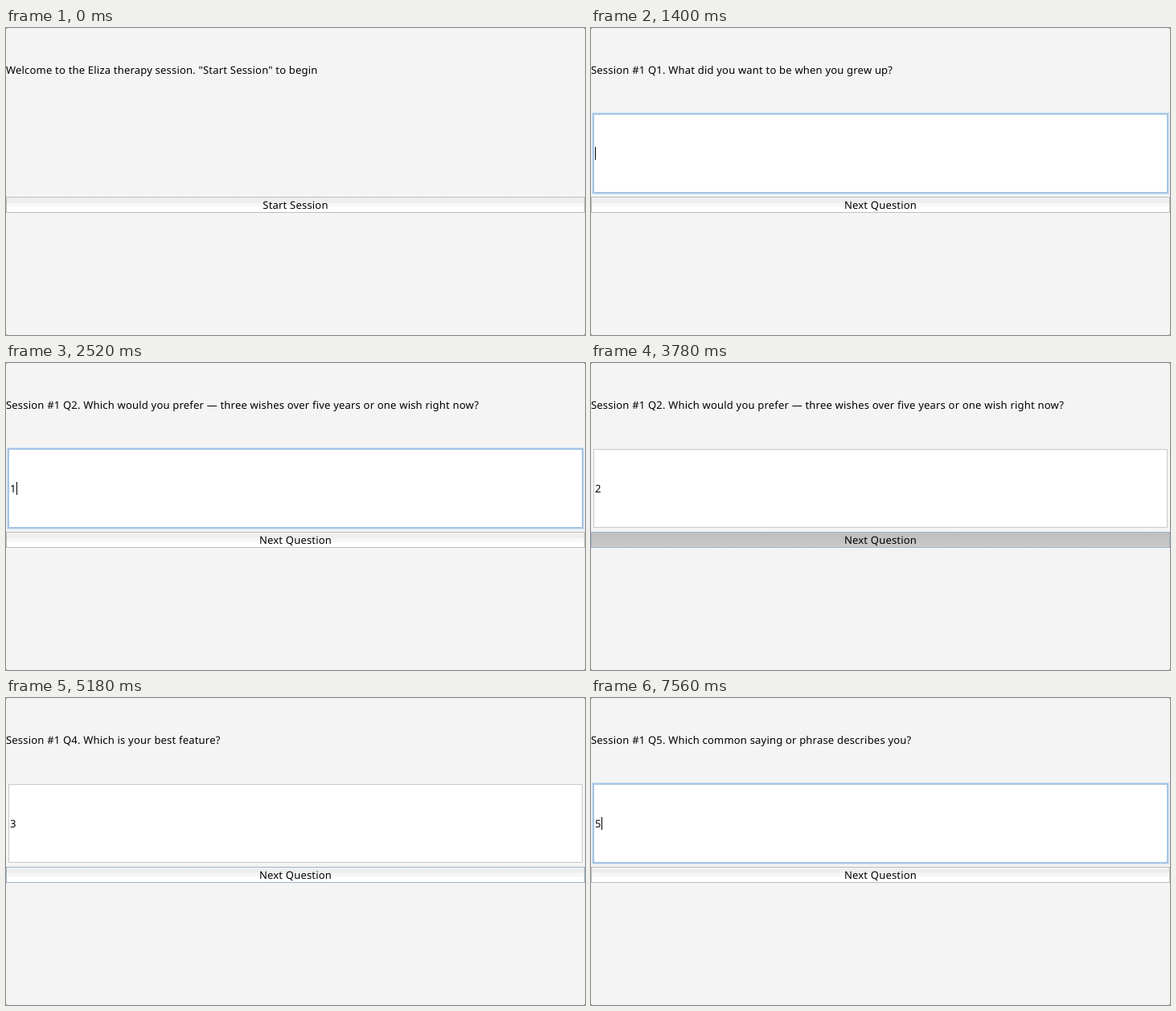
These frames come from a looping animation (720x382 px, 8000 ms). An HTML page:

```html
<!DOCTYPE html>
<html lang="en">
<head>
<meta charset="utf-8">
<title>Eliza therapy session</title>
<style>
html, body { margin: 0; width: 100%; height: 100%; overflow: hidden; background: #777; }
#stage {
  position: relative; width: 720px; height: 382px; overflow: hidden;
  background: #f4f4f4; border-radius: 2px; color: #000;
  font: 13px/18px "Noto Sans", "Open Sans", sans-serif;
  letter-spacing: .2px; text-rendering: geometricPrecision; white-space: pre;
}
#stage div { position: absolute; box-sizing: border-box; }
#prompt { left: 0; top: 43px; }
#field { left: 3px; top: 107px; width: 714px; height: 98px; background: #fff; border: 1px solid #c9c9c9; }
#field.focus { border-color: #a6c5e3; box-shadow: 0 0 0 1px #a3c4e4, 0 0 1px 2px #d3e4f5; }
#mark { left: 0; top: 40px; width: 10px; height: 16px; background: #b5d5ff; }
#answer { left: 1px; top: 39px; }
#caret { top: 40px; width: 1px; height: 16px; background: #000; }
#button {
  left: 0; top: 210px; width: 720px; height: 20px; text-align: center;
  border: 1px solid #bdbdbd;
  background: linear-gradient(#f1f1f1, #ececec 6px, #f6f6f6 7px, #f8f8f8 11px, #fff 12px);
}
#button.down { border-color: #bebebe; background: linear-gradient(#bfbfbf, #c3c3c3 50%, #cbcbcb); }
#button.focus { border-color: #a0b3d0; }
</style>
</head>
<body>
<div id="stage">
  <div id="prompt"></div>
  <div id="field"><div id="mark"></div><div id="answer"></div><div id="caret"></div></div>
  <div id="button"></div>
</div>
<script>
const LOOP = 8000;
const questions = [
  "What did you want to be when you grew up?",
  "Which would you prefer — three wishes over five years or one wish right now?",
  "What is your favorite time of day?",
  "Which is your best feature?",
  "Which common saying or phrase describes you?"
];

// Each event changes part of the state from its time on.
const events = [];
const at = (time, change) => events.push({ time, change });
const press = (time, focusTime) => {
  at(time, { down: true });
  at(focusTime, { focus: "button" });
};
const ask = (time, n) => at(time, {
  prompt: `Session #1 Q${n}. ${questions[n - 1]}`,
  label: "Next Question", field: true, down: false, focus: "button"
});
const focusField = time => at(time, { focus: "field" });
const select = time => at(time, { selected: true });
const type = (time, answer) => at(time, { answer, selected: false });

at(0, {
  prompt: 'Welcome to the Eliza therapy session. "Start Session" to begin',
  label: "Start Session", answer: "", focus: "",
  field: false, down: false, selected: false
});
press(560, 560);
ask(910, 1);
focusField(1400);
type(1540, "1");

press(2030, 2100);
ask(2240, 2);
focusField(2520);
select(2870);
type(3080, "");
type(3220, "2");

press(3710, 3780);
ask(3850, 3);
focusField(4130);
select(4270);
type(4480, "3");

press(5040, 5110);
ask(5180, 4);
focusField(5600);
select(5740);
type(6160, "4");

press(6580, 6650);
ask(6720, 5);
focusField(7000);
select(7140);
type(7280, "");
type(7560, "5");

const $ = id => document.getElementById(id);
const show = (id, on) => { $(id).style.display = on ? "block" : "none"; };

function draw(t) {
  const s = {};
  for (const e of events) if (e.time <= t) Object.assign(s, e.change);
  const inField = s.focus === "field";
  $("prompt").textContent = s.prompt;
  $("button").textContent = s.label;
  $("answer").textContent = s.answer;
  $("caret").style.left = (s.answer ? 9 : 1) + "px";
  show("field", s.field);
  show("mark", s.selected);
  show("caret", inField && !s.selected);
  $("field").classList.toggle("focus", inField);
  $("button").classList.toggle("focus", s.focus === "button");
  $("button").classList.toggle("down", s.down);
}

const start = performance.now();
function tick() {
  draw((performance.now() - start) % LOOP);
  requestAnimationFrame(tick);
}
tick();
</script>
</body>
</html>
```
